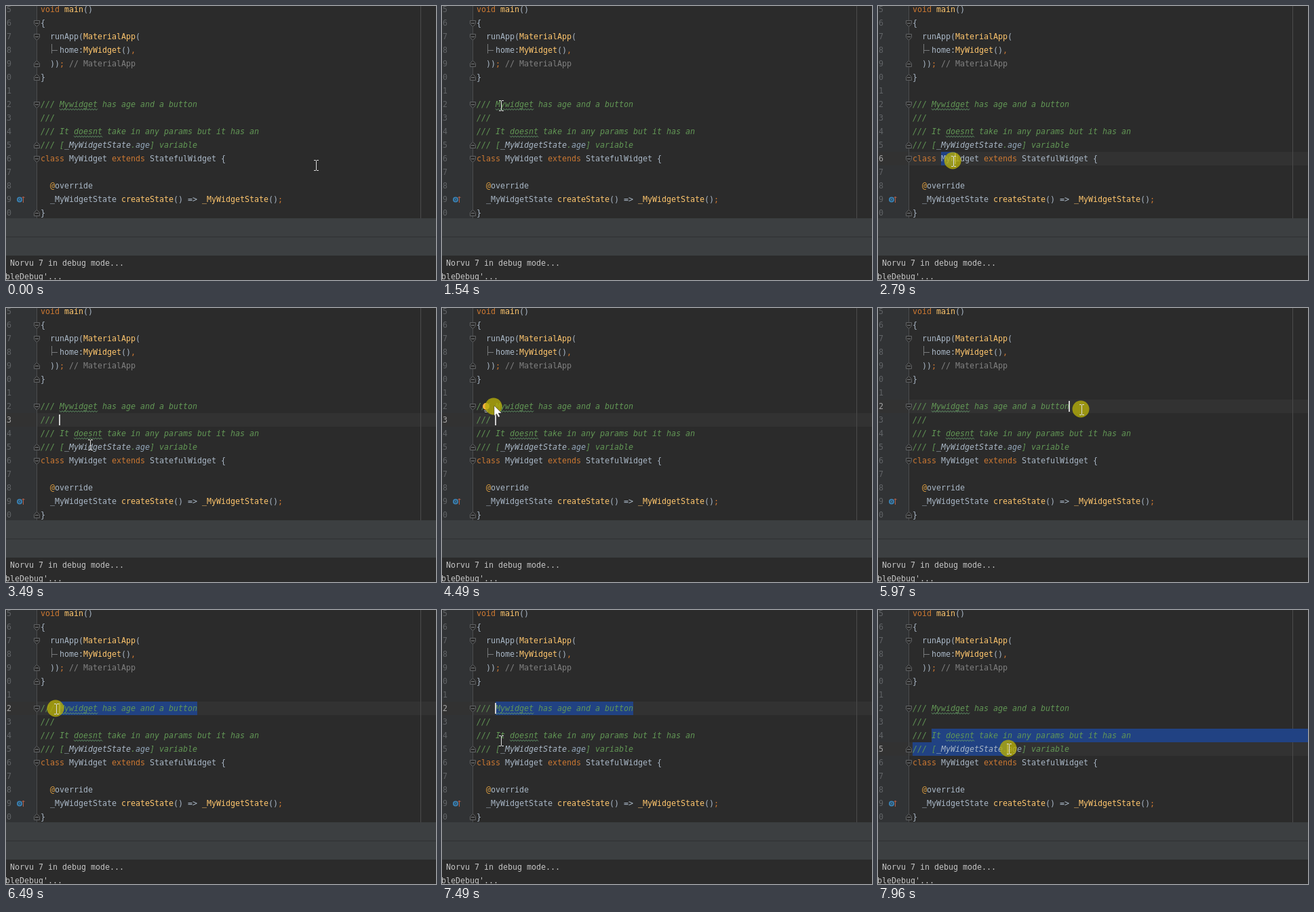
Animation, 634 px wide and 404 px high, one loop 8000 ms. Source, as an HTML page with a canvas:

```html
<!DOCTYPE html>
<html lang="en">
<head>
<meta charset="utf-8">
<title>Code editor</title>
<style>
html, body { margin: 0; width: 634px; height: 404px; overflow: hidden; background: #2b2b2b; }
canvas { display: block; }
</style>
</head>
<body>
<canvas id="stage" width="634" height="404"></canvas>
<script>
const ctx = document.getElementById('stage').getContext('2d');
const LOOP = 8000, LEFT = 51, CHAR = 7, ROW = 20;
const MONO = '11.63px "DejaVu Sans Mono", monospace';
const PLAIN = '#a9b7c6', KEY = '#cc7832', FUNC = '#ffc66d', DOC = '#629755', NOTE = '#808080';

// Each line: column, then colour and text pairs
const lines = {
  5: [0, KEY, 'void ', FUNC, 'main', PLAIN, '()'],
  6: [0, PLAIN, '{'],
  7: [2, PLAIN, 'runApp(', FUNC, 'MaterialApp', PLAIN, '('],
  8: [4, PLAIN, 'home:', FUNC, 'MyWidget', PLAIN, '()', KEY, ','],
  9: [2, PLAIN, '))', KEY, ';', NOTE, ' // MaterialApp'],
  10: [0, PLAIN, '}'],
  12: [0, DOC, '/// Mywidget has age and a button'],
  13: [0, DOC, '///'],
  14: [0, DOC, '/// It doesnt take in any params but it has an'],
  15: [0, DOC, '/// [', PLAIN, '_MyWidgetState', DOC, '.', '#93a7bb', 'age', DOC, '] variable'],
  16: [0, KEY, 'class ', PLAIN, 'MyWidget ', KEY, 'extends ', PLAIN, 'StatefulWidget {'],
  18: [2, '#e0a040', '@', PLAIN, 'override'],
  19: [2, PLAIN, '_MyWidgetState ', FUNC, 'createState', PLAIN, '() => ', FUNC, '_MyWidgetState', PLAIN, '()', KEY, ';'],
  20: [0, PLAIN, '}']
};

const move = (from, to, x, y) => ({ from, to, x, y });
const drag = (from, to, x, y) => ({ from, to, x, y, held: true });

// The pointer rests between gestures
const gestures = [
  move(0, 0, 456, 234),
  move(600, 1440, 86, 144),
  move(1500, 1920, 70, 229),
  move(2020, 2500, 95, 228),
  drag(2750, 2980, 275, 228),
  drag(2980, 3120, 158, 228),
  move(3250, 3800, 71, 162),
  move(3900, 4340, 76, 145),
  drag(4590, 5000, 218, 152),
  move(5150, 5480, 290, 125),
  move(5480, 5900, 299, 149),
  drag(6020, 6480, 73, 145),
  move(6690, 6800, 86, 139),
  move(7000, 7260, 86, 192),
  move(7450, 7740, 82, 190),
  drag(7840, 7950, 192, 204)
];

const rowTop = n => 135 + (n - 12) * ROW;
const colX = c => LEFT + c * CHAR;
const within = (t, a, b) => t >= a && t < b;
const clamp = (v, lo, hi) => Math.min(hi, Math.max(lo, v));

function rect(color, x, y, w, h) {
  ctx.fillStyle = color;
  ctx.fillRect(x, y, w, h);
}

function shape(points, fill, stroke) {
  ctx.beginPath();
  points.forEach(([x, y]) => ctx.lineTo(x, y));
  if (fill) { ctx.closePath(); ctx.fillStyle = fill; ctx.fill(); }
  if (stroke) { ctx.strokeStyle = stroke; ctx.lineWidth = 1; ctx.stroke(); }
}

function disc(color, x, y, r) {
  ctx.fillStyle = color;
  ctx.beginPath();
  ctx.arc(x, y, r, 0, 7);
  ctx.fill();
}

function mono(text, x, y, color, italic) {
  ctx.font = (italic ? 'italic ' : '') + MONO;
  ctx.fillStyle = color;
  [...text].forEach((ch, i) => ctx.fillText(ch, x + i * CHAR, y));
  return x + text.length * CHAR;
}

function pointerAt(t) {
  let x = 0, y = 0, pressed = false;
  for (const g of gestures) {
    const u = clamp((t - g.from) / (g.to - g.from || 1), 0, 1);
    const e = g.to ? u * u * (3 - 2 * u) : 1;
    x += (g.x - x) * e;
    y += (g.y - y) * e;
    if (g.held && within(t, g.from - 100, g.to + 200)) pressed = true;
  }
  return { x, y, pressed };
}

// Caret line and column, with selected spans [line, from, to]
function editorState(t, x) {
  const col = Math.round((x - LEFT) / CHAR);
  if (t < 2650) return { spans: [] };
  if (t < 3480) {
    const end = Math.max(6, col);
    return { row: 16, caret: end, spans: [[16, colX(6), colX(end)]] };
  }
  if (t < 5600) return { row: 13, caret: 4, spans: [] };
  if (t < 7740) {
    const start = t < 6020 ? 33 : t > 6480 ? 4 : clamp(col, 4, 33);
    return { row: 12, caret: start, spans: [[12, colX(start), colX(33)]] };
  }
  if (t < 7890) return { row: 14, caret: 4, spans: [] };
  return { row: 15, caret: col, spans: [[14, colX(4), 634], [15, LEFT, colX(col)]] };
}

function foldMark(n, dir) {
  const y = rowTop(n) + 10.5, x = 45.5;
  const edge = [[x - 4, y - 4 * dir], [x + 4, y - 4 * dir], [x + 4, y + dir], [x, y + 5 * dir], [x - 4, y + dir], [x - 4, y - 4 * dir]];
  shape(edge, '#2b2b2b', '#606264');
  rect('#77797b', 43, y - 0.5, 5, 1);
}

function squiggle(n, from, to) {
  const points = [];
  for (let x = colX(from); x <= colX(to); x += 2) points.push([x, rowTop(n) + 16.5 + (x - colX(from)) % 4]);
  shape(points, null, '#659c6b');
}

function drawEditor(state) {
  rect('#2b2b2b', 0, 0, 634, 404);
  rect('#313335', 0, 0, 46, 314);
  if (state.row) rect('#323232', 0, rowTop(state.row), 634, ROW);
  rect('#4b4d4e', 45, 0, 1, 314);
  rect('#4b4b4b', 611, 0, 1, 314);
  state.spans.forEach(([n, a, b]) => rect('#214283', a, rowTop(n), b - a, ROW));

  for (let n = 5; n <= 20; n++) {
    const label = String(n), base = rowTop(n) + 14;
    mono(label, 8 - label.length * CHAR, base, n === state.row ? '#a4a3a3' : '#606366');
    const [col, ...parts] = lines[n] || [0];
    let x = colX(col);
    for (let i = 0; i < parts.length; i += 2) x = mono(parts[i + 1], x, base, parts[i], n > 11 && n < 16);
  }
  squiggle(12, 4, 12);
  squiggle(14, 7, 13);
  [6, 7, 12, 16].forEach(n => foldMark(n, 1));
  [9, 10, 15, 20].forEach(n => foldMark(n, -1));

  rect('#787a7c', 67, 56, 1, 14);
  rect('#787a7c', 67, 65, 9, 1);

  disc('#3a82b5', 20, 285.5, 4);
  disc('#2f4a5c', 20, 285.5, 2.2);
  disc('#3a82b5', 20, 285.5, 1);
  shape([[25.5, 290], [25.5, 281]], null, '#b5624a');
  shape([[23.5, 283], [25.5, 281], [27.5, 283]], null, '#b5624a');
}

function drawPanels(focused) {
  rect(focused ? '#3d4956' : '#3c3f41', 0, 313, 634, 27);
  rect('#2f3133', 0, 340, 634, 1);
  rect('#3c3f41', 0, 341, 634, 27);
  mono('Norvu 7 in debug mode...', 6, 383, '#c4c4c4');
  mono("bleDebug'...", -1, 403, '#c4c4c4');
}

function drawBulb() {
  disc('#f4af3d', 65, 145, 5);
  rect('#f4af3d', 63, 148, 4, 2);
  rect('#a9abad', 62, 151, 6, 1);
  rect('#a9abad', 63, 153, 4, 1);
}

function drawPopup() {
  ctx.strokeStyle = '#77797b';
  ctx.lineWidth = 1;
  ctx.strokeRect(51.5, 133.5, 43, 27);
  shape([[77, 145], [85, 145], [81, 150]], '#b5b7b9');
  rect('#616365', 50, 174, 279, 24);
  rect('#4b6eaf', 51, 176, 277, 20);
  for (let i = 0; i < 3; i++) rect('#b8bcc4', 61, 182 + i * 3, 7 - i * 2, 1);
  shape([[65, 190], [66, 187], [71, 181], [73, 183], [68, 189]], '#b8bcc4');
  ctx.font = '11.5px "Open Sans", sans-serif';
  ctx.fillStyle = '#c3c7ce';
  ctx.fillText('Convert to block documentation comment', 78.5, 190);
  shape([[312, 181], [318, 186], [312, 191]], '#ffffff');
}

function drawPointer({ x, y, pressed }, arrow) {
  if (pressed) disc('rgba(180, 172, 10, 0.8)', x, y, 12.5);
  x = Math.round(x) + 1;
  y = Math.round(y);
  if (arrow) {
    const tip = [[0, 0], [0, 15], [3.5, 12], [6, 17], [8.5, 16], [6, 11], [11, 11]];
    shape(tip.map(([dx, dy]) => [x + dx, y - 1 + dy]), '#ffffff', 'rgba(0, 0, 0, 0.35)');
    return;
  }
  const color = '#dcdcdc';
  rect(color, x, y - 6, 1, 14);
  for (const dy of [-7, 8]) {
    rect(color, x - 3, y + dy, 3, 1);
    rect(color, x + 1, y + dy, 3, 1);
  }
}

function draw(now) {
  const t = now % LOOP;
  const pointer = pointerAt(t);
  const state = editorState(t, pointer.x + 1);
  const popup = within(t, 4700, 5600);
  drawEditor(state);
  drawPanels(popup);
  if (state.row && !popup) rect('#d0d0d0', colX(state.caret) - 1, rowTop(state.row) + 2, 2, 16);
  if (within(t, 3950, 5600)) drawBulb();
  if (popup) drawPopup();
  drawPointer(pointer, within(t, 4260, 5250));
  requestAnimationFrame(draw);
}
requestAnimationFrame(draw);
</script>
</body>
</html>
```
